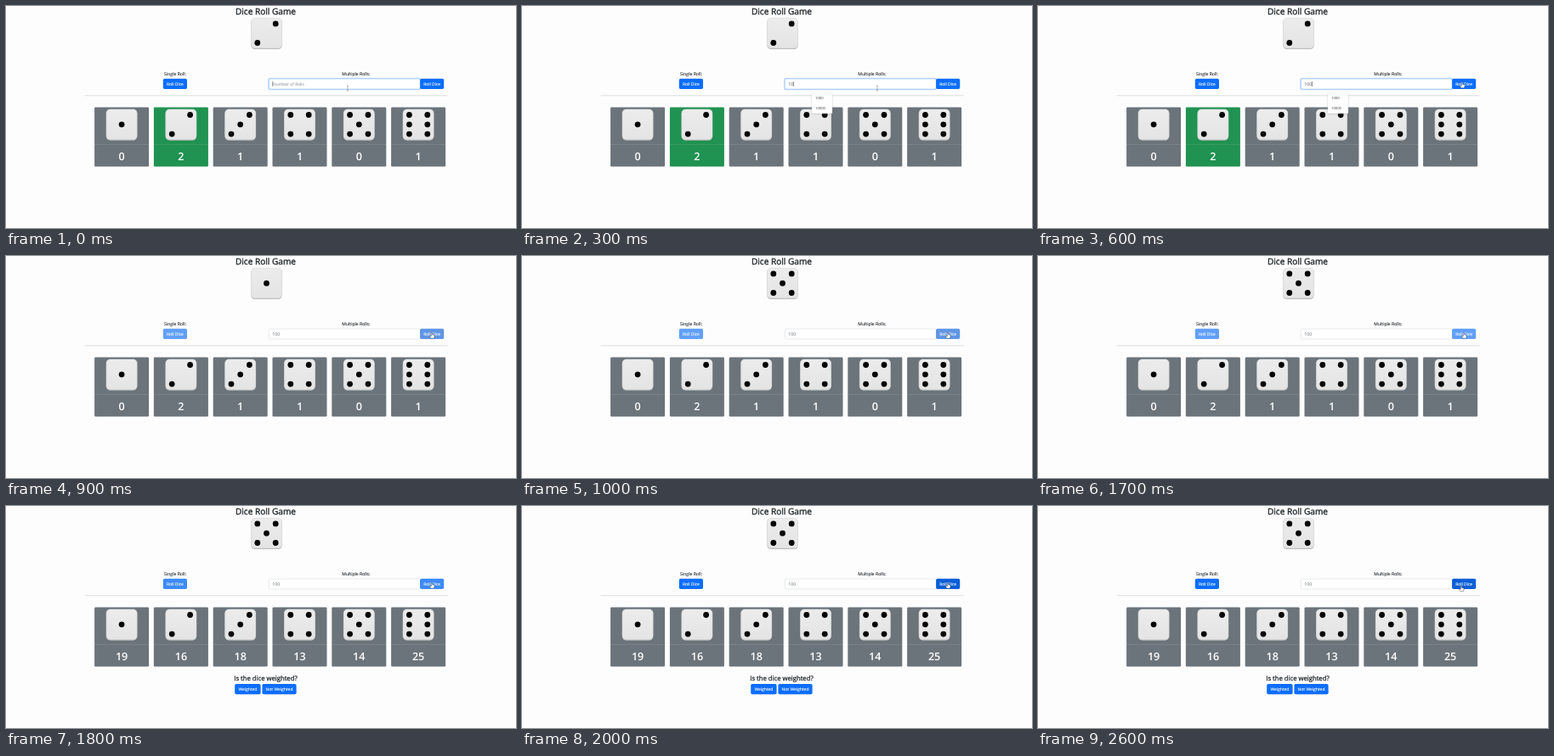
Animation of 600 by 262 pixels, one loop 2.7 s. Source, as an HTML page:

```html
<!DOCTYPE html>
<html lang="en">
<head>
<meta charset="utf-8">
<title>Dice Roll Game</title>
<style>
  html, body { margin: 0; width: 100%; height: 100%; overflow: hidden; background: #fdfdfd; }
  svg { display: block; width: 100vw; height: 100vh; }
  text { font-family: "Open Sans", "Noto Sans", sans-serif; text-rendering: geometricPrecision; }
</style>
</head>
<body>
<svg id="stage" viewBox="0 0 600 262">
  <defs>
    <linearGradient id="face" x1="0" y1="0" x2="0" y2="1">
      <stop offset="0" stop-color="#ececec"/>
      <stop offset="1" stop-color="#e4e4e4"/>
    </linearGradient>
    <filter id="soft" x="-20%" y="-20%" width="140%" height="150%">
      <feGaussianBlur stdDeviation=".8"/>
    </filter>
  </defs>
</svg>
<script>
const LOOP = 2700;
const BLUE = '#0d6efd', HOVER = '#0b5ed7', GREY = '#6b747b', GREEN = '#209251';
const stage = document.getElementById('stage');

function add(parent, tag, attrs, content) {
  const el = document.createElementNS('http://www.w3.org/2000/svg', tag);
  for (const key in attrs) el.setAttribute(key, attrs[key]);
  if (content !== undefined) el.textContent = content;
  parent.appendChild(el);
  return el;
}
const group = (parent = stage) => add(parent, 'g', {});
const rect = (parent, x, y, width, height, rx, fill, extra) =>
  add(parent, 'rect', { x, y, width, height, rx, fill, ...extra });
const label = (parent, x, y, size, str, fill = '#212529', anchor = 'middle', extra) =>
  add(parent, 'text', { x, y, fill, 'font-size': size, 'text-anchor': anchor, ...extra }, str);
// A thin outline thickens regular letters without widening the line.
const outline = (color, width) => ({ stroke: color, 'stroke-width': width });
const heading = (parent, x, y, size, str) =>
  label(parent, x, y, size, str, '#212529', 'middle', outline('#212529', size * .034));

// Pips are numbered 1-9 on a square grid, top left to bottom right.
const PIPS = ['', '5', '37', '357', '1379', '13579', '134679'];
function pips(parent, cx, cy, n) {
  const g = group(parent);
  for (const p of PIPS[n]) {
    const i = p - 1;
    add(g, 'circle', {
      cx: cx + (i % 3 - 1) * 10.7,
      cy: cy + (Math.floor(i / 3) - 1) * 11.3,
      r: 3.4, fill: '#050505'
    });
  }
  return g;
}
function die(parent, cx, cy) {
  rect(parent, cx - 18.2, cy - 17.6, 36.4, 36.4, 4.6, '#b9babb');
  rect(parent, cx - 18, cy - 18, 36, 35.6, 4.4, 'url(#face)', { stroke: '#dadada', 'stroke-width': .5 });
}
function button(parent, x, y, w, str) {
  const g = group(parent);
  const box = rect(g, x, y, w, 12.3, 1.8, BLUE);
  label(g, x + w / 2, y + 8.1, 5, str, '#fff', 'middle', outline('#fff', .12));
  return { g, box };
}

// Header
heading(stage, 305.5, 9.8, 10.1, 'Dice Roll Game');
die(stage, 306.5, 32.2);
const faces = [1, 2, 3, 4, 5, 6].map(n => pips(stage, 306.5, 32.2, n));

// Controls
label(stage, 199, 82, 5.15, 'Single Roll:', '#212529', 'middle', outline('#212529', .1));
label(stage, 412, 82, 5.1, 'Multiple Rolls:', '#212529', 'middle', outline('#212529', .1));
const single = button(stage, 184.8, 85.8, 28.2, 'Roll Dice');
const ring = rect(stage, 308.1, 84.7, 180.2, 14.6, 2.6, '#c2dbfe');
const field = rect(stage, 309.3, 86, 178, 12, 1.8, '#fff', { 'stroke-width': .5 });
const many = button(stage, 487.1, 85.8, 28.1, 'Roll Dice');
const hint = label(stage, 314, 93.9, 4.9, 'Number of Rolls', '#7b8187', 'start');
const typed = label(stage, 313.3, 93.9, 5.2, '', '#50565c', 'start');
const caret = rect(stage, 314, 89, .5, 6, 0, '#333');
rect(stage, 92.5, 105.4, 427, .8, 0, '#d6d7d8');

// Score cards
const before = [0, 2, 1, 1, 0, 1], after = [19, 16, 18, 13, 14, 25];
const cards = before.map((count, i) => {
  const x = 104.1 + i * 69.8, cx = x + 32;
  const box = rect(stage, x, 119.5, 64, 70.1, 1.3, GREY);
  rect(stage, x, 163, 64, .5, 0, '#fff', { opacity: .2 });
  die(stage, cx, 139.9);
  pips(stage, cx, 139.8, i + 1);
  return { box, text: label(stage, cx, 182, 12.6, count, '#fff', 'middle', { 'font-weight': 600 }) };
});

// Question
const ask = group();
heading(ask, 305.5, 205.5, 7.7, 'Is the dice weighted?');
button(ask, 269.2, 209.9, 30.4, 'Weighted');
button(ask, 301.4, 209.9, 40.2, 'Not Weighted');

// Suggestions
const menu = group();
rect(menu, 341, 103.4, 24, 24, 1, '#999', { filter: 'url(#soft)', opacity: .5 });
rect(menu, 341, 102.8, 24, 24, 1, '#fefefe');
label(menu, 345, 110.2, 4.2, '1000', '#444', 'start');
label(menu, 345, 121.8, 4.2, '10000', '#444', 'start');

// Pointers
const beam = add(stage, 'path', {
  d: 'M-1-2.8H1M0-2.8V2.8M-1 2.8H1', fill: 'none', stroke: '#555', 'stroke-width': .4
});
const hand = add(stage, 'path', {
  d: 'M-.7-3.2Q0-4 .6-3.2V-1L2.5-.5Q3-.3 3 .4V1.5L2.3 3.4H-1.1L-2.7 .9Q-2.5 0-1.7 .4L-.7 1.1Z',
  fill: '#fff', stroke: '#222', 'stroke-width': .4, 'stroke-linejoin': 'round'
});

// Each table holds [start ms, value...]; a value lasts until the next start.
const STEPS = {
  face: [[0, 2], [800, 4], [900, 1], [1000, 5], [1100, 3], [1200, 2], [1300, 6],
         [1400, 1], [1500, 4], [1600, 3], [1700, 5]],
  text: [[0, ''], [200, '1'], [300, '10'], [400, '100']],
  fade: [[0, 1], [800, .8], [900, .65], [1800, .8], [1900, .94], [2000, 1]],
  tint: [[0, BLUE], [700, HOVER], [1200, BLUE], [1900, HOVER]],
  pointer: [[0, 402, 97], [300, 418, 97], [400, 450, 96], [500, 484, 94],
            [600, 499, 93.4], [700, 501, 93.8], [2600, 498, 97.4]]
};
const at = (name, t) => STEPS[name].filter(s => s[0] <= t).pop().slice(1);

function draw(ms) {
  const t = Math.floor(ms / 100) * 100;
  const focus = t < 800, done = t >= 1800;
  const [n] = at('face', t), [str] = at('text', t), [fade] = at('fade', t), [tint] = at('tint', t);
  const [px, py] = at('pointer', t);

  faces.forEach((f, i) => show(f, i + 1 === n));
  cards.forEach((c, i) => {
    c.box.setAttribute('fill', i === 1 && focus ? GREEN : GREY);
    c.text.textContent = (done ? after : before)[i];
  });

  single.g.setAttribute('opacity', fade);
  many.g.setAttribute('opacity', fade);
  many.box.setAttribute('fill', tint);

  show(ring, focus);
  field.setAttribute('stroke', focus ? '#86b7fe' : '#ced4da');
  show(hint, !str);
  typed.textContent = str;
  typed.setAttribute('fill', focus ? '#50565c' : '#666c72');
  caret.setAttribute('x', 313.6 + str.length * 2.97);
  show(caret, focus);
  show(menu, t >= 200 && t < 700);
  show(ask, done);

  const overButton = px > 487;
  show(beam, !overButton);
  show(hand, overButton);
  (overButton ? hand : beam).setAttribute('transform', `translate(${px} ${py})`);
}

function show(el, on) {
  el.setAttribute('visibility', on ? 'visible' : 'hidden');
}

const start = performance.now();
function tick(now) {
  draw(Math.max(0, now - start) % LOOP);
  requestAnimationFrame(tick);
}
draw(0);
requestAnimationFrame(tick);
</script>
</body>
</html>
```
